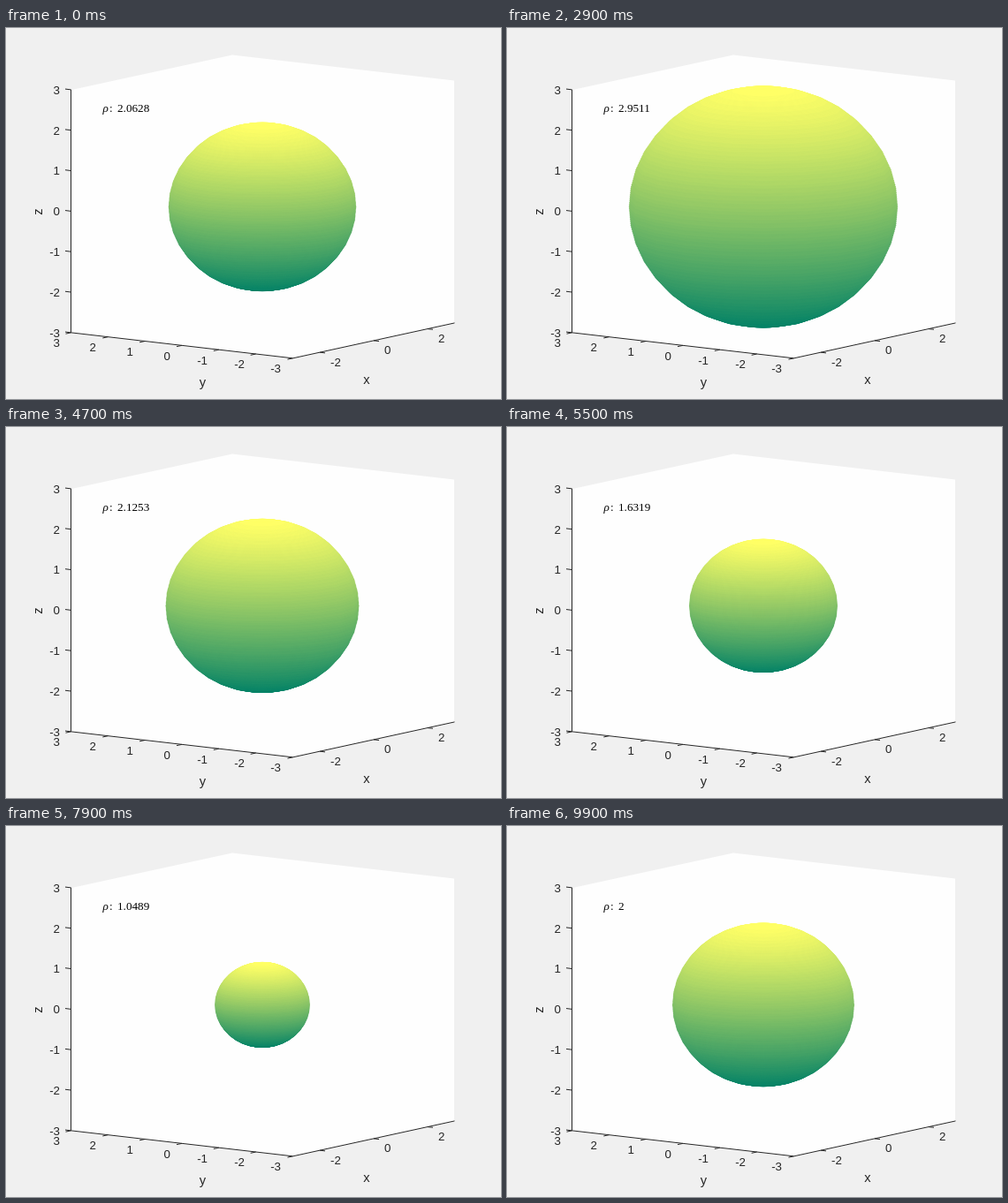
These frames come from a looping animation (560x420 px, 10000 ms). An HTML page with a canvas:

```html
<!DOCTYPE html>
<html lang="en">
<head>
<meta charset="utf-8">
<title>Sphere with varying radius</title>
<style>
  html, body { margin: 0; width: 100%; height: 100%; overflow: hidden; background: #f0f0f0; }
  canvas, svg { position: absolute; left: 0; top: 0; width: 560px; height: 420px; }
  text { font: 13.33px "Liberation Sans", Arial, sans-serif; fill: #262626; }
  .title { font-size: 14.67px; text-anchor: middle; }
  .rho { font: 13.2px "Liberation Serif", "Times New Roman", serif; fill: #000; }
  .rho .sym { font-style: italic; }
</style>
</head>
<body>
<canvas id="plot" width="560" height="420"></canvas>
<svg id="labels" viewBox="0 0 560 420">
  <text class="title" x="408" y="403">x</text>
  <text class="title" x="222.5" y="406">y</text>
  <text class="title" transform="translate(41 208) rotate(-90)">z</text>
  <text class="rho" y="95"><tspan class="sym" x="109.5">ρ</tspan><tspan x="117">:</tspan><tspan id="value" x="126"></tspan></text>
</svg>
<script>
const ctx = document.getElementById('plot').getContext('2d');
const labels = document.getElementById('labels');
const value = document.getElementById('value');
const STEP = 100, STEPS = 100;   // ms per step, steps per loop
const RINGS = 20, SUB = 12, COLORS = 64;
const EDGE = 0.006;              // offsets antialiasing build-up at the rim
const TICKS = [-3, -2, -1, 0, 1, 2, 3];

// Orthographic projection of data coordinates
const project = (x, y, z) => [
  290 + 30.5 * x - 41.83 * y,
  202.4 - 6.65 * x - 4.83 * y - 45.83 * z
];

function path(points) {
  ctx.beginPath();
  for (const p of points) ctx.lineTo(...p);
}

function fill(points, color) {
  path(points);
  ctx.closePath();
  ctx.fillStyle = color;
  ctx.fill();
}

function tick([x, y], dx, dy) {
  path([[x, y], [x + dx, y + dy]]);
  ctx.stroke();
}

function summer(u) {
  const k = Math.min(COLORS - 1, Math.floor(u * COLORS)) / (COLORS - 1);
  return `rgb(${Math.round(255 * k)},${Math.round(127.5 + 127.5 * k)},102)`;
}

// Horizontal cuts through the faceted unit sphere, bottom to top
const slices = [];
for (let i = 0; i < RINGS; i++) {
  const a = (i / RINGS - 0.5) * Math.PI, b = a + Math.PI / RINGS;
  for (let j = 0; j < SUB; j++) {
    const f = j / SUB;
    const z = Math.sin(a) * (1 - f) + Math.sin(b) * f;
    const r = Math.cos(a) * (1 - f) + Math.cos(b) * f;
    slices.push({ z, r, color: summer((z + 1) / 2) });
  }
}
const around = Array.from({ length: RINGS }, (_, k) => {
  const t = 2 * Math.PI * k / RINGS;
  return [Math.cos(t), Math.sin(t)];
});

function drawSphere(rho) {
  for (const { z, r, color } of slices) {
    fill(around.map(([c, s]) => project(rho * r * c, rho * r * s, rho * z)), color);
  }
}

function drawAxes() {
  ctx.strokeStyle = '#262626';
  ctx.lineWidth = 1;
  ctx.save();
  ctx.translate(0.5, -0.5);
  path([project(-3, 3, 3), project(-3, 3, -3), project(-3, -3, -3), project(3, -3, -3)]);
  ctx.stroke();
  for (const v of TICKS) {
    tick(project(-3, 3, v), -6.5, -0.8);
    tick(project(-3, v, -3), -6, 1.3);
    if (v % 2 === 0) tick(project(v, -3, -3), 6, 0.7);
  }
  ctx.restore();
}

function addLabel(text, x, y, anchor) {
  const el = document.createElementNS(labels.namespaceURI, 'text');
  el.setAttribute('x', Math.round(x));
  el.setAttribute('y', Math.floor(y));
  el.setAttribute('text-anchor', anchor);
  el.textContent = text;
  labels.append(el);
}

for (const v of TICKS) {
  const [, zy] = project(-3, 3, v);
  addLabel(v, 60.5, zy + 4.8, 'end');
  const [yx, yy] = project(-3, v, -3);
  addLabel(v, yx - 12.5, yy + 16.4, 'end');
  if (v % 2 === 0) {
    const [xx, xy] = project(v, -3, -3);
    addLabel(v, xx + 12.5, xy + 15.5, 'start');
  }
}

const walls = [[-3, 3, 3], [3, 3, 3], [3, -3, 3], [3, -3, -3], [-3, -3, -3], [-3, 3, -3]]
  .map(p => project(...p));

let shown = -1;
const start = performance.now();

function draw() {
  const n = Math.floor((performance.now() - start) / STEP) % STEPS;
  if (n !== shown) {
    shown = n;
    const rho = 2 + Math.sin(2 * Math.PI * (n + 1) / STEPS);
    ctx.clearRect(0, 0, 560, 420);
    fill(walls, '#fefefe');
    drawSphere(rho - EDGE);
    drawAxes();
    value.textContent = Number(rho.toFixed(4));
  }
  requestAnimationFrame(draw);
}
draw();
</script>
</body>
</html>
```
